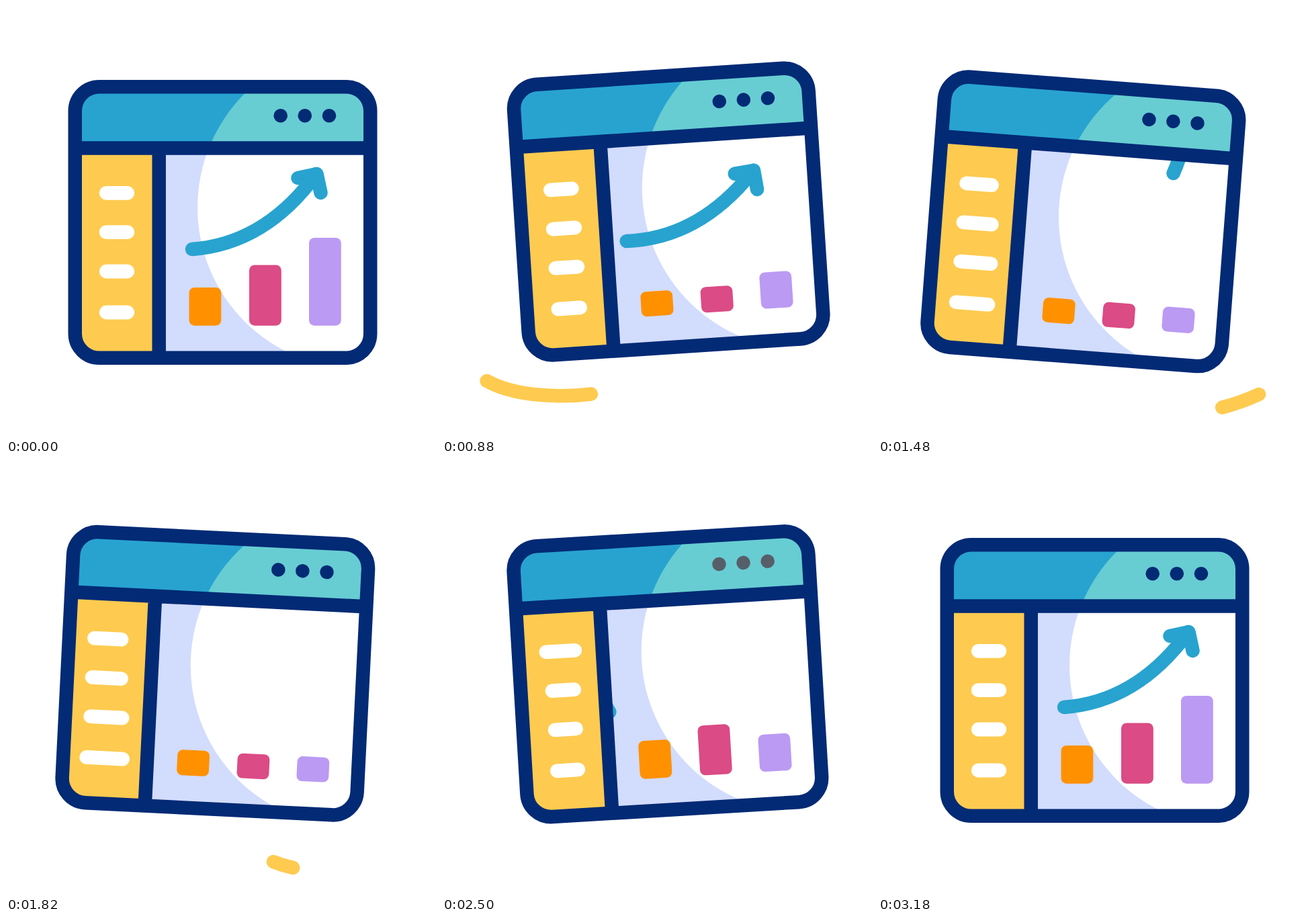
Recreate the animation shown at these times as an HTML page. Size 640 by 640 pixels, loop 3300 ms.

```html
<!DOCTYPE html>
<html lang="en">
<head>
<meta charset="utf-8">
<title>Dashboard window</title>
<style>
  html, body { margin: 0; width: 100%; height: 100%; overflow: hidden; background: #fff; }
  svg { display: block; width: 100%; height: 100%; }
  .line { fill: none; stroke-width: 20.5; stroke-linecap: round; stroke-linejoin: round; }
  .navy { stroke: #032a75; stroke-linecap: butt; }
  .blue { stroke: #28a3cf; }
  .yellow { stroke: #fecb50; }
</style>
</head>
<body>
<svg viewBox="0 0 640 640">
  <defs>
    <clipPath id="frameClip"><rect x="102.75" y="120.25" width="439.5" height="403.5" rx="36"/></clipPath>
    <clipPath id="headClip"><rect x="103" y="120" width="440" height="91"/></clipPath>
    <clipPath id="panelClip"><rect x="228" y="211" width="314" height="313"/></clipPath>
  </defs>
  <path class="line yellow swoosh" pathLength="1" d="M45 543C77 571 122 579 167 580Q195 581 222 577.5"/>
  <path class="line yellow swoosh" pathLength="1" d="M567 578Q470 622 398 592"/>
  <path class="line yellow swoosh" pathLength="1" d="M112 68Q175 29 247 56"/>
  <g id="win">
    <g clip-path="url(#frameClip)">
      <rect x="103" y="120" width="440" height="91" fill="#28a3cf"/>
      <circle cx="525" cy="300" r="240" fill="#67cdd2" clip-path="url(#headClip)"/>
      <rect x="103" y="211" width="125" height="313" fill="#fecb50"/>
      <g clip-path="url(#panelClip)">
        <rect x="228" y="211" width="314" height="313" fill="#d2dcfd"/>
        <circle cx="525" cy="300" r="240" fill="#fff"/>
        <g id="arrow" class="line blue">
          <path d="M277 362Q386 354 462 250"/>
          <path d="M434.500 256L462.500 250L468.500 278"/>
        </g>
      </g>
      <g id="bars"></g>
      <g id="pills" fill="#fff"></g>
      <path class="line navy" d="M103 211.500H542M227.700 211V524"/>
    </g>
    <rect class="line navy" x="102.75" y="120.25" width="439.5" height="403.5" rx="36"/>
    <g id="dots">
      <circle cx="408.7" cy="163.2" r="10.3"/>
      <circle cx="444.800" cy="163.2" r="10.3"/>
      <circle cx="481" cy="163.2" r="10.3"/>
    </g>
  </g>
</svg>
<script>
  const LOOP = 3300;
  const $ = id => document.getElementById(id);

  const ease = u => (1 - Math.cos(Math.PI * u)) / 2;

  // Eased value at time t from a list of [time, value] keys.
  function track(t, keys) {
    if (t <= keys[0][0]) return keys[0][1];
    for (let i = 1; i < keys.length; i++) {
      const [t0, a] = keys[i - 1], [t1, b] = keys[i];
      if (t < t1) return a + (b - a) * ease((t - t0) / (t1 - t0));
    }
    return keys[keys.length - 1][1];
  }

  function addRect(parent, attrs) {
    const el = document.createElementNS('http://www.w3.org/2000/svg', 'rect');
    for (const k in attrs) el.setAttribute(k, attrs[k]);
    $(parent).append(el);
    return el;
  }

  const SWING = [[380, 0], [980, -4], [1584, 5], [2311, -4], [3070, 0]];
  const LIFT = [[260, 0], [800, -15.3], [900, -15.3], [1380, 0], [2100, -15], [2180, -15], [2920, 0.8], [3100, 0]];
  const ARROW_OUT = [[260, 0], [960, 6], [1130, 5.8], [1700, -100]];
  const ARROW_IN = [[2230, 100], [3080, 0]];
  const DOTS = [[900, 0], [1000, 1], [1300, 1], [1400, 0], [2040, 0], [2140, 1], [2440, 1], [2540, 0]];

  const BAR_BASE = 475.7, BAR_MIN = 37;
  const bars = [
    { x: 272.5, h: 56.7, fill: '#ff9100' },
    { x: 362, h: 90.2, fill: '#db4b85' },
    { x: 451, h: 130.7, fill: '#bb9af3' }
  ].map(({ x, h, fill }, i) => ({
    el: addRect('bars', { x, width: 47.8, rx: 8, fill }),
    keys: [[300 + 100 * i, h], [830 + 100 * i, BAR_MIN], [1697 + 281 * i, BAR_MIN], [2525 + 281 * i, h]]
  }));

  // Extra width (w1, w2) and sideways shift (s1..s3) of each sidebar line.
  const pills = [
    { y: 278.4, w1: 4, w2: 9, s1: 2, s2: -4.5, s3: 0.5 },
    { y: 336.7, w1: 10, w2: 12, s1: 5, s2: -3.5, s3: 2 },
    { y: 395, w1: 12, w2: 16, s1: 6, s2: -1, s3: 2 },
    { y: 456, w1: 11, w2: 22.5, s1: 4.5, s2: -0.7, s3: 1 }
  ].map((p, i) => {
    const peak = 1830 + 143 * (3 - i);
    return {
      el: addRect('pills', { y: p.y - 10.4, height: 20.8, rx: 10.4 }),
      width: [[800, 0], [1160, p.w1], [1820, p.w2], [peak, 26], [peak + 450, 0]],
      shift: [[800, 0], [1160, p.s1], [1820, p.s2], [2260, p.s3], [2700, 0]]
    };
  });

  const swooshTimes = [[320, 780, 780, 1190], [1340, 1700, 1560, 1920], [2760, 2980, 2940, 3160]];
  const swooshes = [...document.querySelectorAll('.swoosh')].map((el, i) => ({ el, times: swooshTimes[i] }));

  function trim({ el, times: [headOn, headOff, tailOn, tailOff] }, t) {
    const head = track(t, [[headOn, 0], [headOff, 1]]);
    const tail = track(t, [[tailOn, 0], [tailOff, 1]]);
    const shown = t > headOn && t < tailOff && head > tail;
    el.style.visibility = shown ? 'visible' : 'hidden';
    el.style.strokeDasharray = `${Math.max(head - tail, 0.001)} 3`;
    el.style.strokeDashoffset = -tail;
  }

  function mix(a, b, u) {
    return `rgb(${a.map((v, i) => Math.round(v + (b[i] - v) * u))})`;
  }

  function draw(t) {
    $('win').setAttribute('transform', `translate(0 ${track(t, LIFT)}) rotate(${track(t, SWING)} 320 97)`);
    const turn = track(t, t < 2000 ? ARROW_OUT : ARROW_IN);
    $('arrow').setAttribute('transform', `rotate(${turn} 270 167)`);
    $('arrow').style.visibility = Math.abs(turn) > 99 ? 'hidden' : 'visible';
    $('dots').setAttribute('fill', mix([3, 42, 117], [254, 203, 80], track(t, DOTS)));
    for (const { el, keys } of bars) {
      const h = track(t, keys);
      el.setAttribute('y', BAR_BASE - h);
      el.setAttribute('height', h);
    }
    for (const { el, width, shift } of pills) {
      const w = 52.4 + track(t, width);
      el.setAttribute('x', 165 + track(t, shift) - w / 2);
      el.setAttribute('width', w);
    }
    swooshes.forEach(s => trim(s, t));
  }

  const start = performance.now();
  function tick() {
    draw((performance.now() - start) % LOOP);
    requestAnimationFrame(tick);
  }
  draw(0);
  requestAnimationFrame(tick);
</script>
</body>
</html>
```
